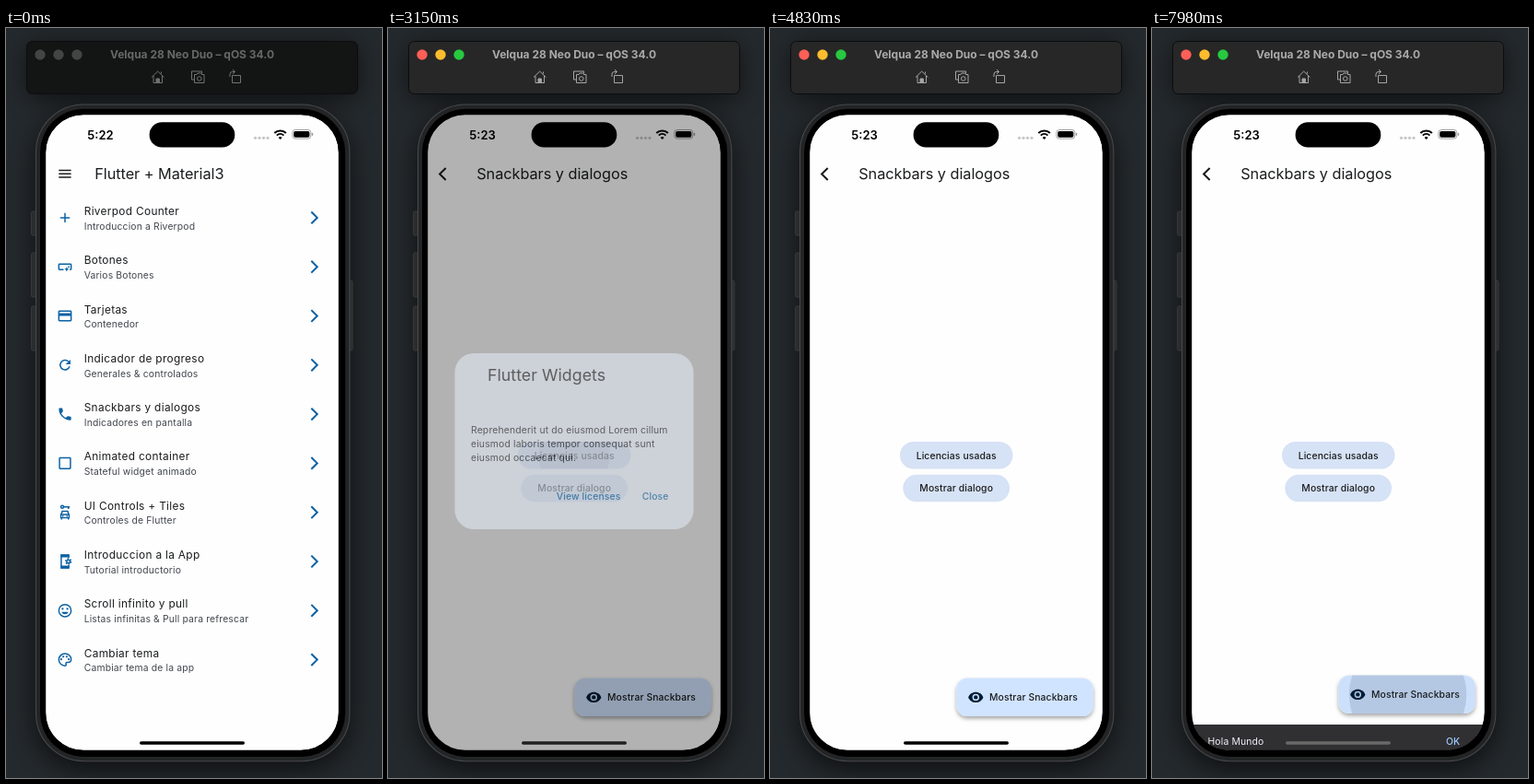
An HTML page for the animation above (8000 ms loop, 408x814 px).

```html
<!DOCTYPE html>
<html lang="es">
<head>
<meta charset="utf-8">
<style>
html, body { margin: 0; width: 100%; height: 100%; overflow: hidden; background: #24292d; }
svg { display: block; width: 408px; height: 814px; }
text { font-family: Inter, Roboto, sans-serif; fill: #1a1c1e; white-space: pre; }
.clock { font-size: 13px; font-weight: 600; fill: #000; }
.bar { font-size: 16.3px; letter-spacing: -.04px; }
.head { font-size: 17.76px; letter-spacing: .03px; }
.item { font-size: 11.84px; letter-spacing: .33px; }
.body { font-size: 10.36px; letter-spacing: .16px; }
.sub { fill: #43474e; }
.label { font-size: 10.36px; font-weight: 500; letter-spacing: .12px; }
.blue { fill: #0061a4; }
.white { fill: #fff; }
.mid { text-anchor: middle; }
.window { font-size: 12px; font-weight: 700; }
.line { fill: none; stroke: currentColor; stroke-width: 2; }
.icons { color: #0b61a3; fill: currentColor; }
</style>
</head>
<body>
<svg id="stage" viewBox="0 0 408 814"></svg>
<script>
const LOOP = 8000, STEP = 70, WIDTH = 318;
const stage = document.getElementById('stage');

const text = (x, y, style, s) => `<text x="${x}" y="${y}" class="${style}">${s}</text>`;
const box = (x, y, w, h, r, extra = '') =>
  `<rect x="${x}" y="${y}" width="${w}" height="${h}" rx="${r}" ${extra}/>`;
const dot = (x, y, r, extra = '') => `<circle cx="${x}" cy="${y}" r="${r}" ${extra}/>`;
const fill = d => `<path d="${d}"/>`;
const line = (d, extra = '') => `<path class="line" d="${d}" ${extra}/>`;
// Icons are drawn on a 24 unit grid and placed by their centre.
const icon = (x, y, art) => `<g transform="translate(${x} ${y}) scale(.74) translate(-12 -12)">${art}</g>`;

const rows = [
  ['Riverpod Counter', 'Introduccion a Riverpod', line('M12 5v14M5 12h14')],
  ['Botones', 'Varios Botones',
    line('M10 16H4q-1 0-1-1V9q0-1 1-1h16q1 0 1 1v6q0 1-1 1h-1') +
    fill('M14.5 19l1.1-2.4 2.4-1.1-2.4-1.1-1.1-2.4-1.1 2.4-2.4 1.1 2.4 1.1zM17.5 14l.6-1.4 1.4-.6-1.4-.6-.6-1.4-.6 1.4-1.4.6 1.4.6z')],
  ['Tarjetas', 'Contenedor', line('M4 5h16q1 0 1 1v12q0 1-1 1H4q-1 0-1-1V6q0-1 1-1z') + fill('M3 8h18v4H3z')],
  ['Indicador de progreso', 'Generales &amp; controlados',
    line('M18.7 14A7 7 0 1 1 17 7') + fill('M20 4v7h-7z')],
  ['Snackbars y dialogos', 'Indicadores en pantalla',
    fill('M6.6 10.8c1.4 2.8 3.8 5.1 6.6 6.6l2.2-2.2q.5-.5 1-.3 1.7.6 3.6.6 1 0 1 1V20q0 1-1 1A17 17 0 0 1 3 4q0-1 1-1h3.5q1 0 1 1 0 1.9.6 3.6.2.5-.3 1z')],
  ['Animated container', 'Stateful widget animado', box(4, 4, 16, 16, 1, 'class="line"')],
  ['UI Controls + Tiles', 'Controles de Flutter',
    dot(8, 4, 2, 'class="line"') + line('M10 4h9M17 4v3M6.5 15l1.5-4.5h8l1.5 4.5M6 15h12v5H6zM7 20v2.5M17 20v2.5') +
    dot(9, 17.5, 1.2) + dot(15, 17.5, 1.2)],
  ['Introduccion a la App', 'Tutorial introductorio',
    line('M17.5 7V2.5h-11v19h11V17') + fill('M6 2h12v4H6zM6 18h12v4H6z') +
    dot(17, 12, 2.5, 'class="line"') + dot(17, 12, 4, 'class="line" stroke-dasharray="2 2.19"')],
  ['Scroll infinito y pull', 'Listas infinitas &amp; Pull para refrescar',
    dot(12, 12, 9, 'class="line"') + dot(8.5, 9.5, 1.5) + dot(15.5, 9.5, 1.5) + fill('M6.9 14h10.2a5.5 5.5 0 0 1-10.2 0z')],
  ['Cambiar tema', 'Cambiar tema de la app',
    line('M12 3a9 9 0 1 0 0 18c1.5 0 2-1.3 1.5-2.5-.6-1.3.2-2.5 1.5-2.5h2a4 4 0 0 0 4-4.5C21 6.5 17 3 12 3z') +
    dot(6.5, 11.5, 1.5) + dot(9.5, 7.5, 1.5) + dot(14.5, 7.5, 1.5) + dot(17.5, 11.5, 1.5)]
];

const homeRow = ([title, subtitle, art], i) => {
  const y = 205.9 + 53.3 * i;
  return text(84.7, y - 3, 'item', title) + text(84.7, y + 12.7, 'body sub', subtitle) +
    `<g class="icons">${icon(64, y, art)}${line(`M331.3 ${y - 6.4}l6.4 6.4-6.4 6.4`)}</g>`;
};

// A pressed button: a faint overlay and a growing circle, clipped to the button.
const ripples = [];
const ripple = (x, y, w, h, r, cx, cy, color, start, end) => {
  const id = 'ripple' + ripples.length;
  ripples.push({ id, start, end });
  return `<clipPath id="${id}clip">${box(x, y, w, h, r)}</clipPath>
    <g id="${id}" clip-path="url(#${id}clip)" fill="${color}">
    ${box(x, y, w, h, r, 'opacity=".02"')}${dot(cx, cy, 0, 'opacity=".12"')}</g>`;
};

const deviceButton = (x, y, h) => box(x, y, 6, h, 1.5, 'fill="#2b2c2d" stroke="#3c3d3e" stroke-width=".8"');
const gray = 'fill="#d6e2f5"', dialogFill = 'fill="#e3ebf7"';

stage.innerHTML = `
<defs>
  <filter id="blur" x="-30%" y="-30%" width="160%" height="160%"><feGaussianBlur stdDeviation="14"/></filter>
  <filter id="lift" x="-20%" y="-30%" width="140%" height="180%"><feDropShadow dx="0" dy="2.5" stdDeviation="2.2" flood-opacity=".35"/></filter>
  <clipPath id="screen">${box(43, 94, WIDTH, 690, 41)}</clipPath>
</defs>
<rect width="408" height="814" fill="#24292d"/>
<g filter="url(#blur)" opacity=".62">${box(25, 20, 355, 55, 6)}${box(32, 92, 341, 712, 52)}</g>

<g id="toolbar">
  ${box(22.5, 14.5, 359, 57, 6, 'id="panel" stroke="#0c0d0d"')}
  <g id="lights" stroke="#000" stroke-opacity=".15" stroke-width=".5">${[37, 57, 77].map(x => dot(x, 29, 5.75)).join('')}</g>
  ${text(202, 33, 'window mid', 'Velqua 28 Neo Duo – qOS 34.0')}
  <g id="tools" fill="none" stroke="currentColor">
    <path d="M158 53.5l6.7-6.5 6.7 6.5M160 52v7.5h9.5V52M168.5 47.5v2"/>
    <path d="M163 59v-4h3.4v4z" fill="currentColor"/>
    <path d="M204 56h-2.5v-9h11v2.5M204.5 50.5h2.5l1-1.5h3.5l1 1.5h2.5v9h-10.5z"/>
    ${dot(209.8, 55, 2.3)}
    <path d="M245.5 51.5h9v8h-9zM243 53v-3q0-2.5 3-2.5h2M246 45l2.5 2.5-2.5 2.5"/>
  </g>
</g>

${[[199, 26], [244, 48], [302, 48]].map(([y, h]) => deviceButton(27.5, y, h)).join('')}
${deviceButton(370, 274, 76)}
${box(32.5, 83, 340.4, 712.7, 52, 'fill="#232425" stroke="#47484a" stroke-width="1.1"')}
${box(36.5, 87.2, 332.2, 704.3, 48, 'fill="#000" stroke="#2c2d2e" stroke-width=".8"')}

<g clip-path="url(#screen)">
  <g id="home">
    ${box(43, 94, WIDTH, 690, 0, 'fill="#fefefe"')}
    ${line('M57.3 154.5h13.3M57.3 158.3h13.3M57.3 162.1h13.3', 'style="stroke-width:1.5" color="#1a1c1e"')}
    ${text(96.2, 164.3, 'bar', 'Flutter + Material3')}
    ${rows.map(homeRow).join('')}
  </g>
  <g id="page">
    ${box(43, 94, WIDTH, 690, 0, 'fill="#fefefe"')}
    ${line('M62.7 152l-6.6 6.5 6.6 6.5', 'color="#1a1c1e"')}
    ${text(96.2, 164.3, 'bar', 'Snackbars y dialogos')}
    ${box(141, 449, 122.5, 29.6, 14.8, gray)}
    ${ripple(141, 449, 122.5, 29.6, 14.8, 202, 464, '#101c2b', 3080, 3360)}
    ${text(202.2, 467.7, 'label mid', 'Licencias usadas')}
    ${box(144.3, 484.7, 115.7, 29.6, 14.8, gray)}
    ${ripple(144.3, 484.7, 115.7, 29.6, 14.8, 202, 499.5, '#101c2b', 5250, 5530)}
    ${text(202.2, 503.2, 'label mid', 'Mostrar dialogo')}
    <g id="fab">
      ${box(202.3, 705.6, 148.5, 41.4, 12, 'fill="#d1e4ff" filter="url(#lift)"')}
      ${ripple(202.3, 705.6, 148.5, 41.4, 12, 277.6, 726.5, '#001d36', 7840, LOOP)}
      <g fill="#001d36" fill-rule="evenodd">${icon(223.3, 726.4,
        fill('M12 4.5C7 4.5 2.7 7.6 1 12c1.7 4.4 6 7.5 11 7.5s9.3-3.1 11-7.5c-1.7-4.4-6-7.5-11-7.5zM12 17a5 5 0 1 1 0-10 5 5 0 1 1 0 10zM12 9a3 3 0 1 0 0 6 3 3 0 1 0 0-6z'))}</g>
      ${text(238, 730.2, 'label', 'Mostrar Snackbars')}
    </g>
    <g id="snack">
      ${box(43, 784, WIDTH, 60, 0, 'fill="#303033"')}
      <text x="60.5" y="805.7" class="body" style="fill:#f1f0f4">Hola Mundo</text>
      <text x="319" y="805.7" class="label" style="fill:#9ecaff">OK</text>
    </g>
  </g>
  <g id="status">
    ${text(88.3, 120.6, 'clock', '')}
    <g fill="#c6c6c8">${[270.5, 275, 279.5, 284].map(x => dot(x, 119.3, 1.6)).join('')}</g>
    <g class="line" color="#000">
      <path d="M291.3 114a9 9 0 0 1 12.6 0M293.8 116.6a5.5 5.5 0 0 1 7.6 0"/>
      <path d="M297.6 121l-2-2.1a3 3 0 0 1 4 0z" fill="#000" stroke="none"/>
    </g>
    ${box(310.8, 110.5, 20, 9.6, 3, 'fill="none" stroke="#999" stroke-width=".9"')}
    ${box(312.2, 111.9, 17.2, 6.8, 1.8)}
    ${box(331.8, 113.7, 1.3, 3.2, .6, 'fill="#999"')}
  </g>
  ${box(43, 94, WIDTH, 690, 0, 'id="barrier"')}
  <g id="about">
    ${box(72.5, 353, 259, 191, 20.7, dialogFill)}
    ${text(108, 382.7, 'head', 'Flutter Widgets')}
    ${['Reprehenderit ut do eiusmod Lorem cillum', 'eiusmod laboris tempor consequat sunt', 'eiusmod occaecat qui.']
      .map((s, i) => text(90, 439.7 + 14.9 * i, 'body', s)).join('')}
    ${ripple(267, 494, 46, 29.6, 14.8, 290, 508.5, '#0061a4', 4550, 4830)}
    ${text(182.8, 512.2, 'label blue', 'View licenses')}
    ${text(275.7, 512.2, 'label blue', 'Close')}
  </g>
  <g id="confirm">
    ${box(72.5, 371.6, 259, 153.5, 20.7, dialogFill)}
    ${text(90, 407.2, 'head', 'Estas seguro?')}
    ${text(90, 436.4, 'body', 'Do non exercitation incididunt labore ex')}
    ${text(90, 451.3, 'body', 'deserunt adipisicing occaecat ex.')}
    ${text(178.3, 493.7, 'label blue', 'Cancelar')}
    ${box(238.3, 475.1, 75.7, 29.6, 14.8, 'class="blue"')}
    ${ripple(238.3, 475.1, 75.7, 29.6, 14.8, 257.5, 490, '#fff', 6720, 7000)}
    ${text(276, 493.7, 'label white mid', 'Aceptar')}
  </g>
  ${box(145, 774.3, 114, 3.5, 1.75, 'id="indicator"')}
</g>
${box(42.5, 93.5, WIDTH + 1, 691, 41.5, 'fill="none" stroke="#000" stroke-width="1.4"')}
${box(155.6, 102.3, 92.7, 27.2, 13.6)}`;

const $ = id => document.getElementById(id);
const set = (el, attrs) => Object.entries(attrs).forEach(([k, v]) => el.setAttribute(k, v));
const clamp = v => Math.max(0, Math.min(1, v));
const shift = (id, x, y = 0) => set($(id), { transform: `translate(${x} ${y})` });
const clock = stage.querySelector('.clock'), windowTitle = stage.querySelector('.window');

const paintToolbar = active => {
  set($('panel'), { fill: active ? '#272727' : '#131515' });
  windowTitle.style.fill = active ? '#aaa' : '#676868';
  set($('tools'), { color: active ? '#a5a5a5' : '#717272' });
  const colors = active ? ['#ff5f57', '#febc2e', '#28c840'] : Array(3).fill('#434444');
  [...$('lights').children].forEach((el, i) => set(el, { fill: colors[i] }));
};

const dialogAlpha = (t, open, close) => {
  const v = t < close ? clamp((t - open) / 210) : 1 - clamp((t - close) / 210);
  return 1 - (1 - v) ** 2;
};

function draw(time) {
  const t = Math.floor(time / STEP) * STEP;
  paintToolbar(t >= 1680);
  clock.textContent = t < 70 ? '5:22' : '5:23';

  const slide = 1 - (1 - clamp((t - 1680) / 350)) ** 3;
  shift('home', -WIDTH / 3 * slide);
  shift('page', WIDTH * (1 - slide));

  const about = dialogAlpha(t, 3080, 4620), confirm = dialogAlpha(t, 5250, 6790);
  const dim = Math.max(about, confirm);
  set($('about'), { opacity: about });
  set($('confirm'), { opacity: confirm });
  set($('barrier'), { opacity: .54 * dim });

  const rise = 28 * clamp((t - 7840) / 140) ** 2;
  shift('snack', 0, -rise);
  shift('fab', 0, -Math.max(0, rise - 25));
  const tone = rise > 10 ? 104 : Math.round(58 * dim);
  set($('indicator'), { fill: `rgb(${tone},${tone},${tone})` });

  for (const { id, start, end } of ripples) {
    const on = t >= start && t < end;
    set($(id), { visibility: on ? 'visible' : 'hidden' });
    if (on) set($(id).lastElementChild, { r: 14 + .355 * (t - start) });
  }
}

const begin = performance.now();
function tick() {
  draw((performance.now() - begin) % LOOP);
  requestAnimationFrame(tick);
}
tick();
</script>
</body>
</html>
```
